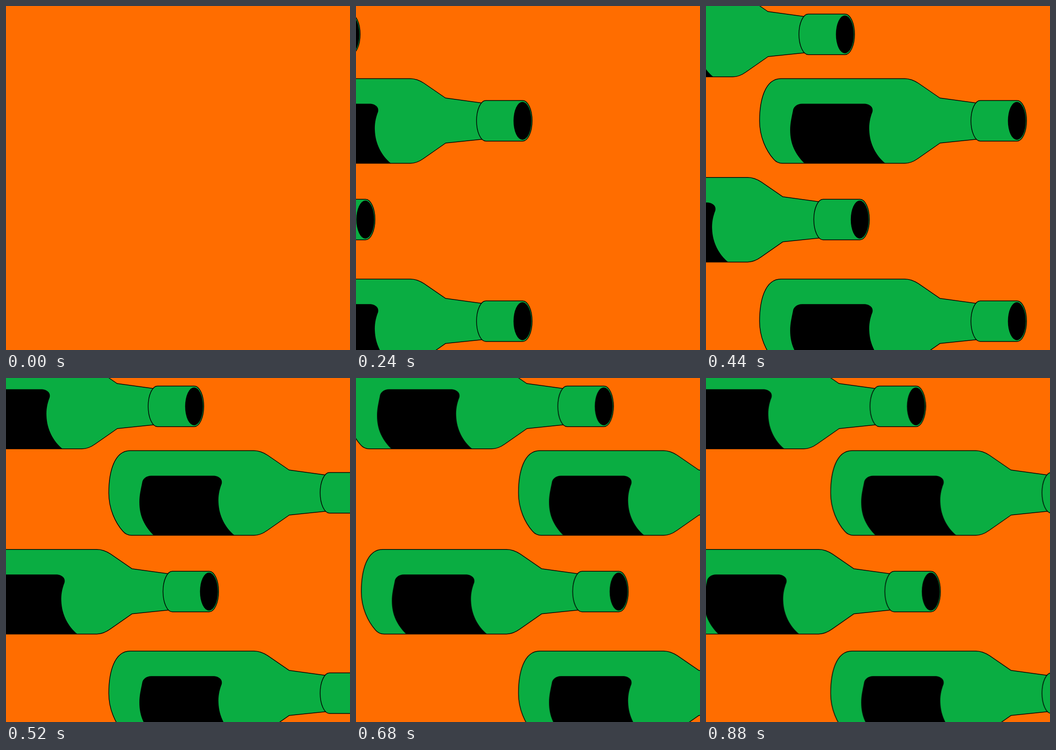
An HTML page without scripts for the animation above (1160 ms loop, 748 px wide and 748 px high).

```html
<!DOCTYPE html>
<html lang="en">
<head>
<meta charset="utf-8">
<title>Bottles</title>
<style>
  html, body {
    margin: 0;
    width: 100%;
    height: 100%;
    overflow: hidden;
    background: #ff6d00;
  }
  svg {
    display: block;
    width: 100%;
    height: 100%;
  }
  .glass {
    fill: #0aad42;
    stroke: #000;
    stroke-width: 1.5;
    stroke-linejoin: round;
  }
  .slide {
    animation: slide 1160ms steps(2) infinite;
  }
  /* 25 poses a second: fast entry, overshoot, settle, hold */
  @keyframes slide {
    0%      { transform: translateX(-753px); }
    6.896%  { transform: translateX(-617px); }
    13.793% { transform: translateX(-463.5px); }
    20.689% { transform: translateX(-314px); }
    27.586% { transform: translateX(-177px); }
    34.482% { transform: translateX(-55.5px); animation-timing-function: step-end; }
    37.931% { transform: translateX(0); }
    44.827% { transform: translateX(107px); }
    51.724% { transform: translateX(198px); animation-timing-function: step-end; }
    55.172% { transform: translateX(230px); animation-timing-function: step-end; }
    58.62%  { transform: translateX(236.7px); }
    65.517% { transform: translateX(204px); }
    72.413% { transform: translateX(162px); animation-timing-function: step-end; }
    75.862%, 100% { transform: translateX(154.5px); }
  }
</style>
</head>
<body>
<svg viewBox="0 0 748 748" aria-hidden="true">
  <defs>
    <g id="bottle">
      <path class="glass" d="M163 158H432C442 158 453 162 462 168L508.5 200L596 212V289L509 298L461 331.5C452 338 442 342 432 342H166C159 342 152 339 147 333C131 315 116.5 285 116.5 250C116.5 205 128 158 163 158Z"/>
      <path d="M209 212.5H343C356 212.5 364.500 220 362 230C356 245 354.500 258 355 270C356 300 370 326 390 342H214C194 322 183 300 183 270C183 255 186 243 189 228C190 219 198 212.500 209 212.500Z"/>
      <path class="glass" d="M596.300 205.500H676.500A20.500 44.100 0 0 1 676.500 293.700H596.300A20.200 44.100 0 0 1 596.300 205.500Z"/>
      <ellipse cx="676" cy="249.700" rx="19.500" ry="41.300"/>
    </g>
  </defs>
  <g class="slide">
    <use href="#bottle" x="-374" y="-188"/>
    <use href="#bottle"/>
    <use href="#bottle" x="-341.700" y="214.700"/>
    <use href="#bottle" y="435.700"/>
  </g>
</svg>
</body>
</html>
```
